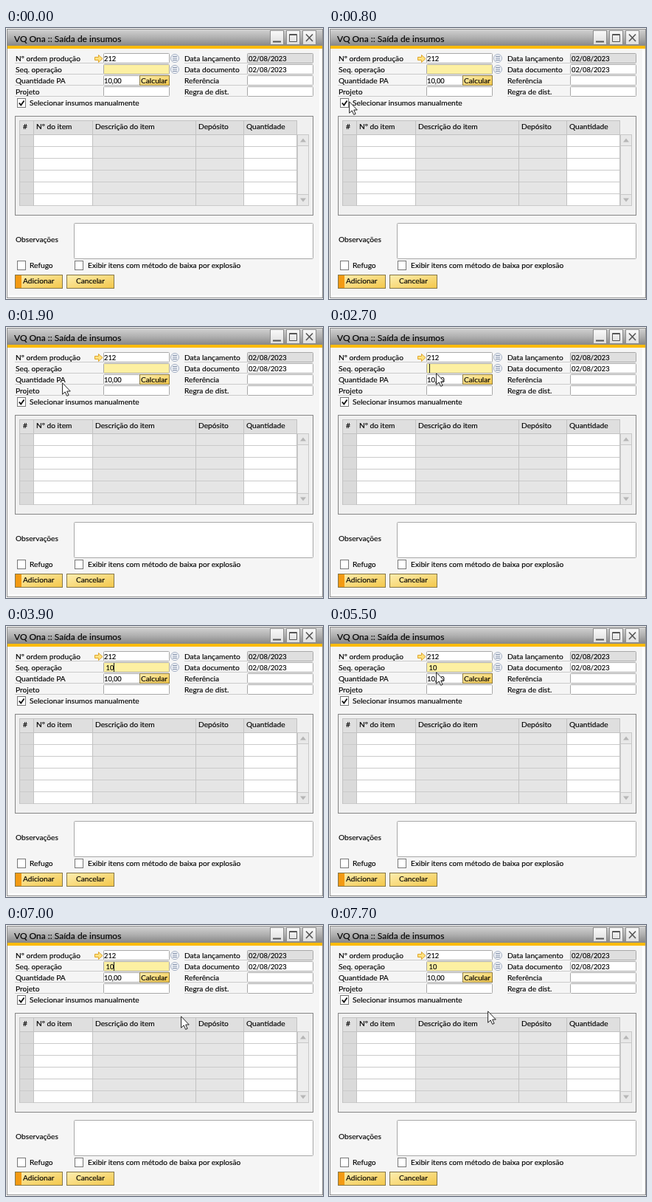
These frames come from a looping animation (430x367 px, 8 s). An HTML page:

```html
<!DOCTYPE html>
<html lang="pt">
<head>
<meta charset="utf-8">
<title>Saída de insumos</title>
<style>
html, body { margin: 0; width: 100%; height: 100%; overflow: hidden; background: #fff; }
svg { display: block; width: 430px; height: 367px; }
text { font-family: Lato, "Open Sans", sans-serif; font-size: 10.2px; fill: #000; stroke: #000; stroke-width: .15px; white-space: pre; }
.num { font-size: 9.3px; }
.title { font-size: 12px; }
</style>
</head>
<body>
<svg id="stage" viewBox="0 0 430 367">
  <defs>
    <linearGradient id="bar" x2="0" y2="1">
      <stop offset="0" stop-color="#d2d2d2"/><stop offset=".5" stop-color="#b0b0b0"/><stop offset="1" stop-color="#878787"/>
    </linearGradient>
    <linearGradient id="gold" x2="1" y2="1">
      <stop offset="0" stop-color="#fdeeb0"/><stop offset="1" stop-color="#f3c74a"/>
    </linearGradient>
    <linearGradient id="pale" x2="0" y2="1">
      <stop offset="0" stop-color="#fafafa"/><stop offset="1" stop-color="#dedede"/>
    </linearGradient>
  </defs>
</svg>
<script>
const NS = "http://www.w3.org/2000/svg";
const stage = document.getElementById("stage");

function add(tag, attrs) {
  const el = document.createElementNS(NS, tag);
  for (const key in attrs) el.setAttribute(key, attrs[key]);
  return stage.appendChild(el);
}
const fill = (x, y, width, height, color) => add("rect", { x, y, width, height, fill: color });
const box = (x, y, w, h, color, stroke = "#a8a8a8", rx = 0) =>
  add("rect", { x: x + .5, y: y + .5, width: w - 1, height: h - 1, fill: color, stroke, rx });
const path = (d, stroke, color = "none", width = 1) =>
  add("path", { d, stroke, fill: color, "stroke-width": width });
function label(x, y, str, cls = "") {
  const el = add("text", { x, y, class: cls });
  el.textContent = str;
  return el;
}

function drawWindow() {
  box(1, 1, 429, 365, "#fff", "#8c8c8c");
  fill(4, 28, 421, 334, "#f5f5f5");
  fill(2, 2, 427, 22, "url(#bar)");
  fill(2, 24, 427, 4, "#fdbb0c");
  label(11, 19, "VQ Ona :: Saída de insumos", "title");
  for (const x of [358, 380, 402]) box(x, 3, 19, 20, "url(#pale)", "#8d8d8d");
  path("M362 18.5H373", "#555", "none", 2);
  path("M384.5 8.5H394.5V18.5H384.5ZM384 9.5H395", "#555");
  path("M407 8.5L416 18M416 8.5L407 18", "#555", "none", 1.6);
}

function drawForm() {
  const left = ["Nº ordem produção", "Seq. operação", "Quantidade PA", "Projeto"];
  const right = ["Data lançamento", "Data documento", "Referência", "Regra de dist."];
  left.forEach((name, row) => {
    const y = 34 + row * 15;
    path(`M12 ${y + 13.5}H132M242 ${y + 13.5}H327`, "#cbcbcb");
    label(13, y + 11, name);
    label(242, y + 11, right[row]);
    box(132, y, row === 2 ? 50 : 90, 14, row === 1 ? "#fdf0a2" : "#fff", "#a8a8a8", 1);
    box(327, y, 90, 14, row ? "#fff" : "#dfdfdf", "#a8a8a8", 1);
  });
  label(133, 45, "212", "num");
  label(133, 75, "10,00", "num");
  label(329, 45, "02/08/2023", "num");
  label(329, 60, "02/08/2023", "num");
  path("M120.5 39.5H125.5V36.5L131 41.5L125.5 46.5V43.5H120.5Z", "#e0a52c", "#ffe27f");
  for (const y of [41, 56]) {
    add("circle", { cx: 229, cy: y, r: 5.5, fill: "#f2f4f8", stroke: "#a4b0c4" });
    path(`M226 ${y - 2.5}h6m-6 2.5h6m-6 2.5h6`, "#7e8da6");
  }
  box(181, 64, 41, 14, "url(#gold)", "#8d7b42");
  label(183, 75, "Calcular");
}

function drawCheck(x, y, str, textX, on) {
  box(x, y, 12, 13, "#fff", "#777");
  if (on) path(`M${x + 2.8} ${y + 6.5}l2.5 3l4.2 -6`, "#111", "none", 1.9);
  label(textX, y + 10, str);
}

function drawTable() {
  const cols = [18, 37, 117, 257, 322, 394];
  const heads = ["#", "Nº do item", "Descrição do item", "Depósito", "Quantidade"];
  const tones = ["#dadada", "#fff", "#e5e5e5", "#e5e5e5", "#fff"];
  box(12, 119, 405, 135, "#f0f0f0", "#868686");
  heads.forEach((name, i) => {
    const x = cols[i], w = cols[i + 1] - x;
    fill(x, 125, w, 19, "#dfdfdf");
    fill(x, 144, w, 97, tones[i]);
    label(x + (i ? 4 : 5), 137, name);
  });
  for (let y = 160; y <= 240; y += 16) path(`M18 ${y + .5}H394`, "#cacaca");
  for (const x of cols) path(`M${x + .5} 125V241`, "#c2c2c2");
  path("M18 125.5H394M18 144.5H394", "#c2c2c2");
  box(395, 144, 16, 97, "#eee", "#c8c8c8");
  box(395, 144, 16, 16, "#e8e8e8", "#c8c8c8");
  box(395, 225, 16, 16, "#e8e8e8", "#c8c8c8");
  path("M399 154.5L403 149.5L407 154.5ZM399 230.5L403 235.5L407 230.5Z", "none", "#b6b6b6");
}

function drawFooter() {
  label(13, 290, "Observações");
  box(92, 264, 325, 49, "#fff", "#a8a8a8", 1);
  drawCheck(15, 315, "Refugo", 32);
  drawCheck(93, 315, "Exibir itens com método de baixa por explosão", 111);
  box(12, 334, 65, 19, "url(#gold)", "#857748");
  fill(13, 335, 8, 17, "#f39a13");
  box(82, 334, 65, 19, "url(#gold)", "#857748");
  label(23, 346, "Adicionar");
  label(95, 346, "Cancelar");
}

drawWindow();
drawForm();
drawCheck(15, 95, "Selecionar insumos manualmente", 32, true);
drawTable();
drawFooter();

const typed = label(135.5, 60, "", "num");
const caret = fill(136, 50, 1, 12, "#222");
const pointer = path("M.6 .8V16.2L4.2 12.9L6.7 18.4L9.1 17.3L6.7 12H11.3Z", "#222", "#fff");

// Pointer strokes: start time, then one x,y pair per 100 ms.
const moves = [
  [500, 35, 0, 32, 42, 29, 80, 27, 99, 27, 104],
  [1100, 25, 103, 24, 102, 27, 101, 37, 100, 44, 99, 34, 99],
  [1800, 45, 92, 76, 75, 116, 57, 147, 47, 154, 50, 146, 58],
  [2600, 146, 61, 145, 62],
  [5900, 170, 79, 211, 107, 244, 128, 257, 131, 237, 125],
  [6500, 236, 124, 237, 123],
  [7300, 235, 115],
  [7500, 229, 116, 221, 116, 215, 116]
];
// Caret states: start time and x, where 0 is hidden.
const carets = [
  [0, 0], [2700, 136], [3200, 0], [3600, 141], [3900, 146], [4500, 0],
  [5000, 146], [5500, 0], [6000, 146], [6500, 0], [7000, 146], [7500, 0]
];
const latest = (list, t) => list.filter(item => item[0] <= t).pop();

function render(t) {
  const move = latest(moves, t);
  pointer.style.display = move && !(t >= 3900 && t < 4100) ? "" : "none";
  if (move) {
    const step = Math.min(Math.floor((t - move[0]) / 100), (move.length - 3) / 2);
    pointer.setAttribute("transform", `translate(${move[1 + step * 2]} ${move[2 + step * 2]})`);
  }
  const x = latest(carets, t)[1];
  caret.style.display = x ? "" : "none";
  caret.setAttribute("x", x);
  typed.textContent = t < 3600 ? "" : t < 3900 ? "1" : "10";
}

const start = performance.now();
function tick() {
  render((performance.now() - start) % 8000);
  requestAnimationFrame(tick);
}
tick();
</script>
</body>
</html>
```
